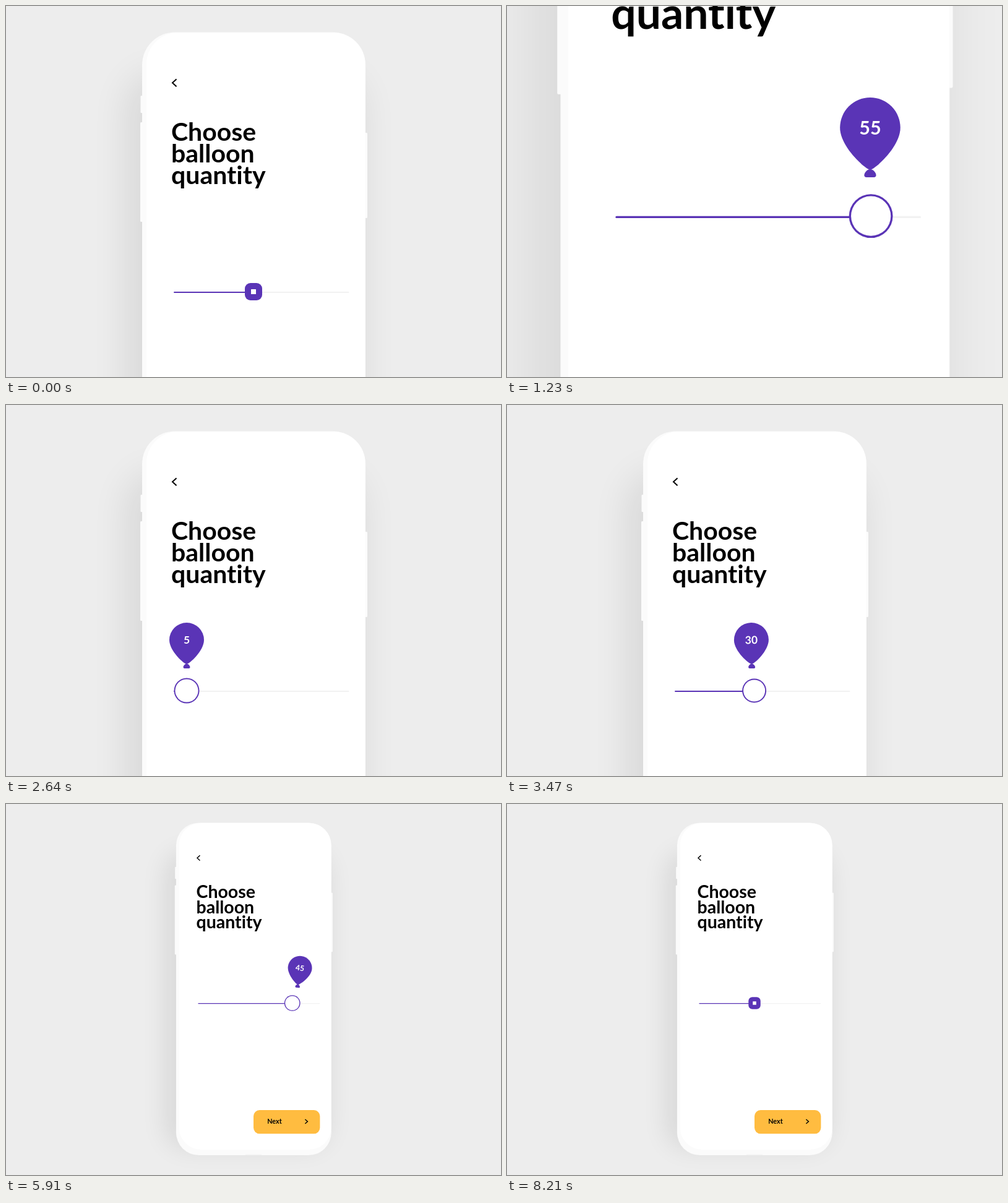
Recreate the animation shown at these times as an HTML page. Size 800 px wide and 600 px high, loop 8620 ms.

```html
<!DOCTYPE html>
<html lang="en">
<head>
<meta charset="utf-8">
<title>Balloon slider</title>
<style>
  html, body { margin: 0; width: 100%; height: 100%; overflow: hidden; background: #ededed; }
  svg { display: block; width: 800px; height: 600px; }
  text { font-family: Lato, "Open Sans", sans-serif; font-weight: 700; font-variant-ligatures: none; }
  .purple { fill: #5a34b6; }
  .arrow { fill: none; stroke: #000; stroke-width: 2; }
</style>
</head>
<body>
<svg viewBox="0 0 800 600">
  <defs>
    <filter id="blur" x="-50%" y="-30%" width="200%" height="160%">
      <feGaussianBlur stdDeviation="30"/>
    </filter>
  </defs>
  <rect width="800" height="600" fill="#ededed"/>
  <g id="camera">
    <rect x="195" y="110" width="380" height="690" rx="50" opacity=".085" filter="url(#blur)"/>
    <g fill="#fbfbfb">
      <rect x="217.5" y="145" width="5" height="28" rx="1.5"/>
      <rect x="217" y="188" width="5" height="161" rx="1.5"/>
      <rect x="578" y="205" width="6" height="138" rx="1.5"/>
      <rect x="220" y="42.5" width="361" height="773.5" rx="53"/>
    </g>
    <rect x="227" y="43" width="353.5" height="760" rx="51" fill="#fff"/>
    <rect x="381" y="814" width="38" height="2" fill="#f3f3f3"/>

    <path class="arrow" d="M275.5 118.3 269 124.3 275.5 130.3"/>
    <g font-size="41">
      <text x="267" y="218">Choose</text>
      <text x="267" y="253">balloon</text>
      <text x="267" y="288">quantity</text>
    </g>

    <rect x="400" y="711" width="154.5" height="55" rx="14" fill="#ffbc40"/>
    <text x="432" y="743.3" font-size="15.5">Next</text>
    <path class="arrow" d="M520 732.5 525.8 737.5 520 742.5"/>

    <g stroke-width="1.9" stroke-linecap="round">
      <path d="M272 463H553.5" stroke="#f2f2f2"/>
      <path id="fill" stroke="#5a34b6"/>
    </g>
    <rect id="outer" class="purple"/>
    <rect id="inner" fill="#fff"/>
    <g id="balloon">
      <path class="purple" d="M0 0C-4 0-28-21-28-39A28 28 0 0 1 28-39C28-21 4 0 0 0Z"/>
      <path class="purple" d="M0-.5C3-.5 5.500 3 5.500 5Q5.500 7 3.500 7H-3.500Q-5.500 7-5.500 5C-5.500 3-3-.5 0-.5Z"/>
      <text id="count" y="-32.800" font-size="17.500" text-anchor="middle" fill="#fff"></text>
    </g>
  </g>
</svg>
<script>
const LOOP = 8620, SECOND_RUN = 4080, SECOND_CUT = 4110;
const REST_X = 400, THUMB_Y = 462;
const $ = id => document.getElementById(id);
const [camera, fill, outer, inner, balloon, count] =
  ['camera', 'fill', 'outer', 'inner', 'balloon', 'count'].map($);

const span = (t, start, dur) => Math.min(1, Math.max(0, (t - start) / dur));
const mix = (a, b, k) => a + (b - a) * k;
const cubic = u => u < .5 ? 4 * u ** 3 : 1 - 4 * (1 - u) ** 3;
const quad = u => u < .5 ? 2 * u * u : 1 - 2 * (1 - u) ** 2;
const easeOut = u => 1 - (1 - u) ** 3;

// Drag right, left, back to rest; the number runs ahead of the thumb.
const moves = [
  { start: 500, dur: 720, dist: 108, countStart: 385, countDur: 600, step: 25 },
  { start: 1557, dur: 1000, dist: -216, countStart: 1565, countDur: 840, step: -50 },
  { start: 2750, dur: 800, dist: 108, countStart: 2720, countDur: 600, step: 25 }
];
const sum = f => moves.reduce((total, m) => total + f(m), 0);

const thumbX = t => REST_X + sum(m => m.dist * cubic(span(t, m.start, m.dur)));
const number = t => Math.round(30 + sum(m => m.step * quad(span(t, m.countStart, m.countDur))));

// The balloon leans back while moving, then swings out.
function tilt(t) {
  return sum(m => {
    const u = span(t, m.start, m.dur);
    const speed = 12 * Math.min(u, 1 - u) ** 2 / m.dur;
    const s = Math.max(0, t - m.start - m.dur - 90);
    const swing = 13 * Math.sin(2 * Math.PI * s / 500) * Math.exp(-s / 200);
    return Math.sign(m.dist) * (swing - 7800 * speed);
  });
}

// [scale, y of the slider on the stage]
function shot(t) {
  if (t >= SECOND_CUT) return [.695, 322];
  return t >= 430 && t < 2250 ? [1.742, 339.7] : [1, THUMB_Y];
}

function square(el, x, half, radius) {
  const attrs = { x: x - half, y: THUMB_Y - half, width: 2 * half, height: 2 * half, rx: radius };
  for (const name in attrs) el.setAttribute(name, attrs[name]);
}

function draw(time) {
  const [zoom, y] = shot(time);
  camera.setAttribute('transform',
    `translate(${REST_X} ${y}) scale(${zoom}) translate(${-REST_X} ${-THUMB_Y})`);

  const t = time < SECOND_CUT ? time : time - SECOND_RUN;
  const x = thumbX(t), tipX = thumbX(t - 95);
  fill.setAttribute('d', `M272 463H${x}`);

  const ring = 20.5 - 2 * Math.min(1, Math.abs(x - tipX) / 8);
  const release = cubic(span(t, 3800, 330));
  const grow = cubic(span(t, 10, 407)) - release;
  const open = cubic(span(t, 30, 423)) - release;
  square(outer, x, mix(14, ring, grow), mix(9, ring, grow));
  square(inner, x, mix(4, ring - 1.9, open), mix(.5, ring - 1.9, Math.min(1, open * 1.3)));

  const size = easeOut(span(t, 80, 400)) - cubic(span(t, 3740, 320));
  const rise = cubic(span(t, 110, 450)) - cubic(span(t, 3650, 250));
  balloon.setAttribute('visibility', size > .01 ? 'visible' : 'hidden');
  balloon.setAttribute('transform',
    `translate(${tipX} ${THUMB_Y - 43 * rise}) rotate(${tilt(t)}) scale(${Math.max(0, size)})`);
  count.textContent = number(t);
}

const begin = performance.now();
function tick() {
  draw((performance.now() - begin) % LOOP);
  requestAnimationFrame(tick);
}
tick();
</script>
</body>
</html>
```
